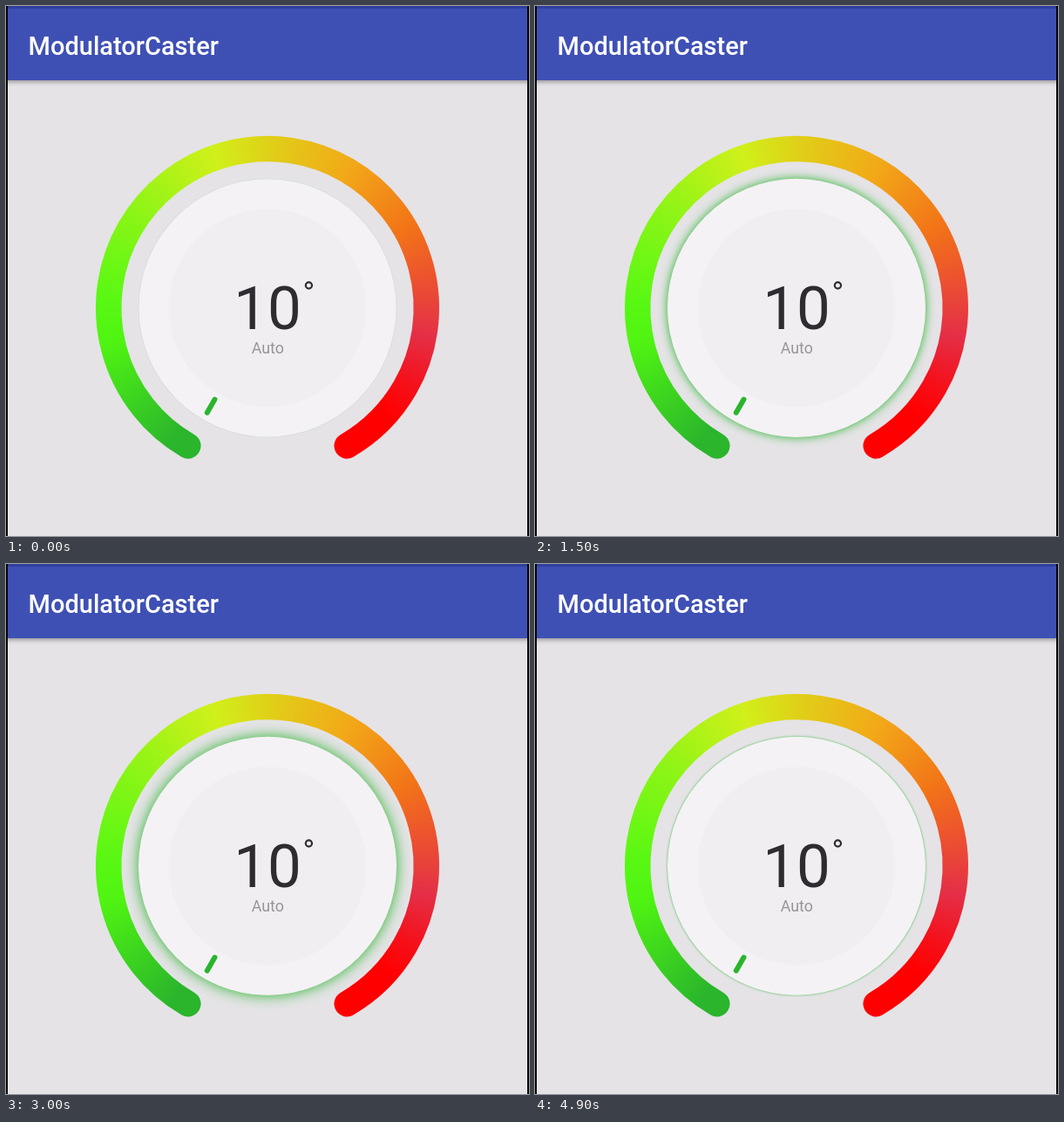
These frames come from a looping animation (600x607 px, 5000 ms). An HTML page with a canvas:

```html
<!DOCTYPE html>
<html lang="en">
<head>
<meta charset="utf-8">
<title>Dial</title>
<style>
  html, body { margin: 0; width: 100%; height: 100%; overflow: hidden; background: #e5e3e6; }
  .stage { position: absolute; left: 0; top: 0; width: 600px; height: 607px; }
  canvas { position: absolute; left: 0; top: 0; }
  .bar {
    position: absolute; left: 0; top: 0; width: 600px; height: 84.5px;
    box-sizing: border-box; border-top: 3px solid #303f9f; background: #3f50b5;
    box-shadow: 0 2px 5px rgba(0, 0, 0, .36);
  }
  .edge { position: absolute; top: 0; width: 2px; height: 607px; background: #000; }
  svg { position: absolute; left: 0; top: 0; font-family: Roboto, sans-serif; }
</style>
</head>
<body>
<div class="stage">
  <canvas id="dial" width="600" height="607"></canvas>
  <div class="bar"></div>
  <svg width="600" height="607">
    <text x="25.5" y="56" font-size="29" font-weight="500" fill="#fff">ModulatorCaster</text>
    <text x="300" y="369.5" font-size="69" text-anchor="middle" fill="#2e2c31">10</text>
    <circle cx="347.4" cy="320" r="3.6" fill="none" stroke="#2e2c31" stroke-width="2.2"/>
    <text x="300.3" y="398" font-size="17.8" text-anchor="middle" fill="#979599">Auto</text>
  </svg>
  <div class="edge" style="left:0"></div>
  <div class="edge" style="left:598px"></div>
</div>
<script>
const LOOP = 5000, STEP = 100;
const CX = 300, CY = 345.8;
const GREEN = '#2ab52c';
const ctx = document.getElementById('dial').getContext('2d');
const rad = deg => deg * Math.PI / 180;

// angle clockwise from the right, colour
const SWEEP = [
  [90, GREEN], [125, GREEN], [168, '#50f412'], [182, '#58f813'],
  [215, '#8af516'], [251, '#d0f01a'], [271, '#e0cf18'], [300, '#f2a918'],
  [330, '#f27417'], [350, '#ec5130'], [370, '#e42f47'], [388, '#f5101a'],
  [402, '#ff0000'], [430, '#ff0000'], [450, GREEN]
];
const sweep = ctx.createConicGradient(rad(90), CX, CY);
SWEEP.forEach(([deg, color]) => sweep.addColorStop((deg - 90) / 360, color));

// time in ms, reach of the glow in px
const GLOW = [
  [0, 0], [400, 1.4], [900, 5], [1500, 10], [2000, 14], [2500, 16],
  [2900, 15.8], [3500, 12.6], [4000, 8.4], [4400, 5], [4900, 1.6], [5000, 0]
];

function glowAt(t) {
  const i = GLOW.findIndex(k => k[0] > t);
  const [t0, a] = GLOW[i - 1], [t1, b] = GLOW[i];
  return a + (b - a) * (t - t0) / (t1 - t0);
}

function disc(r, color) {
  ctx.beginPath();
  ctx.arc(CX, CY, r, 0, 2 * Math.PI);
  ctx.fillStyle = color;
  ctx.fill();
}

function stroke(width, color) {
  ctx.lineWidth = width;
  ctx.strokeStyle = color;
  ctx.stroke();
}

function draw(t) {
  ctx.clearRect(0, 0, 600, 607);
  ctx.lineCap = 'round';

  ctx.beginPath();
  ctx.arc(CX, CY, 182.3, rad(120), rad(420));
  stroke(29.4, sweep);

  const glow = glowAt(t);
  if (glow > 0) {
    ctx.save();
    ctx.shadowColor = GREEN;
    ctx.shadowBlur = glow * 0.95 + 1;
    disc(148, '#f4f2f5');
    ctx.restore();
  } else {
    disc(148.4, '#d6dbd9');
  }
  disc(147.6, '#f4f2f5');
  disc(113.3, '#f0eef1');

  const c = Math.cos(rad(120)), s = Math.sin(rad(120));
  ctx.beginPath();
  ctx.moveTo(CX + 121 * c, CY + 121 * s);
  ctx.lineTo(CX + 138.5 * c, CY + 138.5 * s);
  stroke(5.9, GREEN);
}

function tick() {
  draw(Math.floor(performance.now() % LOOP / STEP) * STEP);
  requestAnimationFrame(tick);
}
tick();
</script>
</body>
</html>
```
